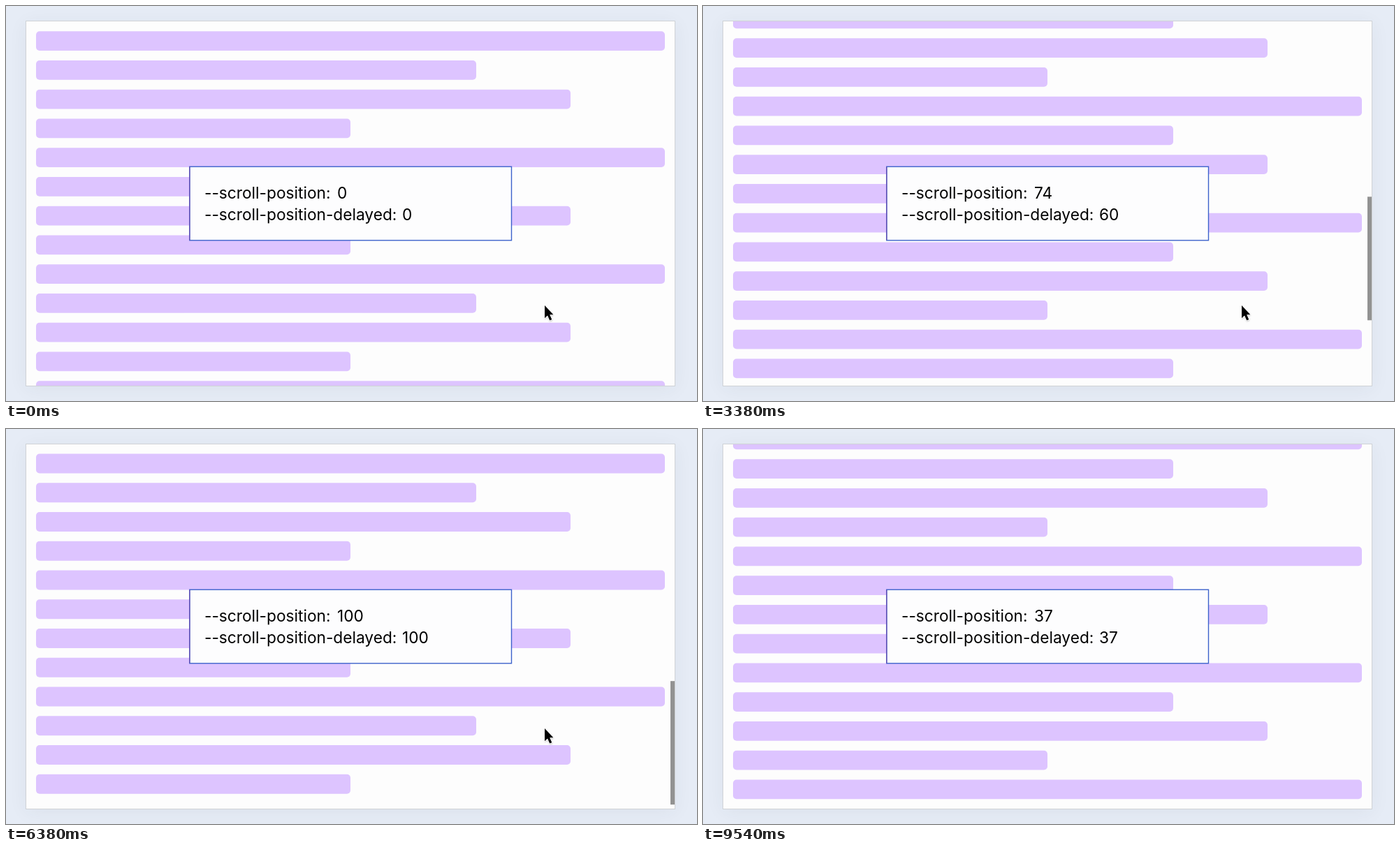
These frames come from a looping animation (989 px wide and 566 px high, 9750 ms). An HTML page:

```html
<!DOCTYPE html>
<html lang="en">
<head>
<meta charset="utf-8">
<title>Scroll position</title>
<style>
  html, body { margin: 0; width: 100%; height: 100%; overflow: hidden; background: #e6ecf6; }
  svg { display: block; width: 100%; height: 100%; }
  text { font: 400 22.7px Inter, sans-serif; fill: #000; }
</style>
</head>
<body>
<svg viewBox="0 0 989 566">
  <defs>
    <clipPath id="view"><rect x="29" y="22" width="928" height="522"/></clipPath>
    <filter id="blur" x="-10%" y="-10%" width="120%" height="120%"><feGaussianBlur stdDeviation="14"/></filter>
    <filter id="soft" x="-50%" y="-50%" width="200%" height="200%"><feGaussianBlur stdDeviation="1.2"/></filter>
  </defs>
  <rect width="989" height="566" fill="#e6ecf6"/>
  <rect x="29" y="26" width="928" height="522" fill="#1c2a3c" opacity=".06" filter="url(#blur)"/>
  <rect x="28.5" y="21.5" width="929" height="523" fill="#fdfdfd" stroke="#cfd2d6"/>
  <g clip-path="url(#view)">
    <g id="bars" fill="#ddc4ff"></g>
    <rect id="thumb" x="951" width="6" height="177" fill="#929292"/>
  </g>
  <rect x="262.8" y="230.2" width="460.7" height="105.6" fill="#fdfdfe" stroke="#3c62cb" stroke-width="1.4"/>
  <path d="M262.8 230.5V335.5" stroke="#6550b4" stroke-width="1.4"/>
  <text x="284" y="276">--scroll-position:</text>
  <text id="now" x="474" y="276"></text>
  <text x="284" y="307">--scroll-position-delayed:</text>
  <text id="late" x="567" y="307"></text>
  <g id="cursor">
    <path d="M771 430V449L775 445L778.3 452L782 450.5L779 443.5H784Z" opacity=".35" filter="url(#soft)"/>
    <path d="M771 429V447.2L775.1 443.4L778.2 450.6L781.3 449.2L778.2 442.2H783.4Z"
          stroke="#fff" stroke-width="2" paint-order="stroke" stroke-linejoin="round"/>
  </g>
</svg>
<script>
const LOOP = 9750, MAX_SCROLL = 1002.6, DELAY = 100;
const $ = id => document.getElementById(id);
const clamp = (v, lo = 0, hi = 1) => Math.min(hi, Math.max(lo, v));

// Flicks: start ms, target percent, time scale, steepness
const flicks = [
  [960, 1.5, 160, 2],
  [1580, 38, 361, 2.25],
  [2880, 90, 477.4, 3.36],
  [4290, 15, 342.6, 2.45],
  [5670, 104, 330, 2.3],
  [6960, 36.78, 247.7, 2],
];
// Scrollbar: shown from, gone at
const shown = [[960, 1380], [1580, 2540], [2880, 4130], [4290, 5460], [5670, 6790], [6960, 8500]];

function position(t) {
  let pos = 0;
  for (const [start, target, scale, steep] of flicks) {
    if (t < start) break;
    pos += (target - pos) * (1 - Math.exp(-(((t - start) / scale) ** steep)));
    pos = clamp(pos, 0, 100);
  }
  return pos;
}

function thumbOpacity(t) {
  const span = shown.find(([from, to]) => t >= from && t < to);
  return span ? clamp((t - span[0]) / 40) * clamp((span[1] - t) / 150) : 0;
}

const widths = [900, 630, 765, 450];
for (let i = 0; i < 36; i++) {
  const bar = document.createElementNS("http://www.w3.org/2000/svg", "rect");
  const attrs = { x: 43, y: 36.2 + i * 41.75, width: widths[i % 4], height: 27.8, rx: 5 };
  for (const key in attrs) bar.setAttribute(key, attrs[key]);
  $("bars").append(bar);
}

function draw(t) {
  const pos = position(t), scroll = pos / 100 * MAX_SCROLL;
  $("bars").setAttribute("transform", `translate(0 ${-scroll})`);
  $("thumb").setAttribute("y", 23.8 + scroll * 0.3365);
  $("thumb").setAttribute("opacity", thumbOpacity(t));
  // The readout trails slightly on the way up
  $("now").textContent = Math.round(Math.max(pos, position(t - 6)));
  $("late").textContent = Math.round(position(t - DELAY));
  $("cursor").setAttribute("opacity", clamp((9500 - t) / 250));
}

const begin = performance.now();
function tick() {
  draw((performance.now() - begin) % LOOP);
  requestAnimationFrame(tick);
}
tick();
</script>
</body>
</html>
```
